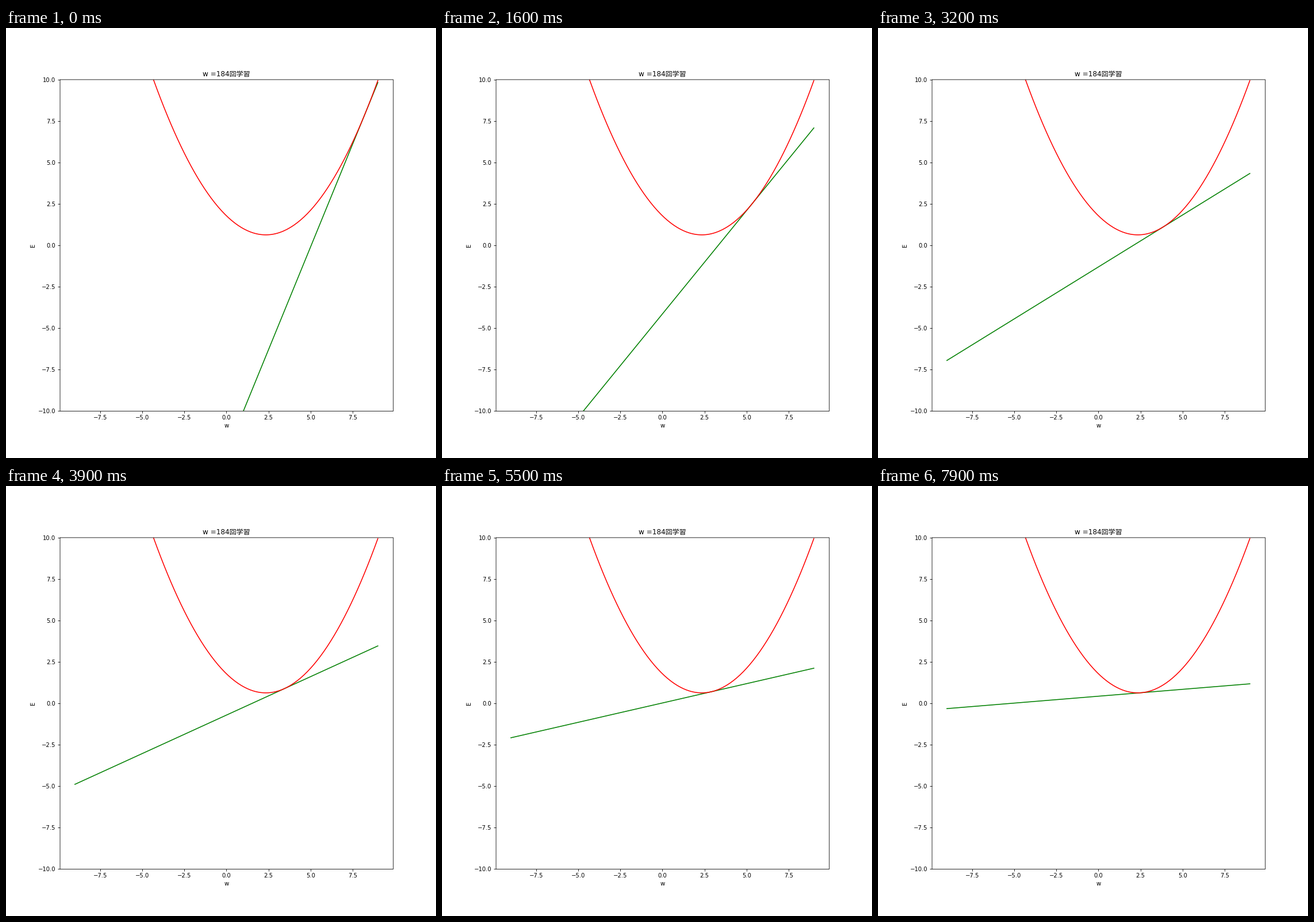
A matplotlib script that plays this animation: 748x748 px, repeating every 8000 ms.

```python
import numpy as np
import matplotlib.pyplot as plt
from matplotlib.animation import FuncAnimation

INCHES, DPI = 10, 74.8
STEPS, INTERVAL = 80, 100

# Error curve E(w) = A (w - W_MIN)^2 + E_MIN
A, W_MIN, E_MIN = 0.2104, 2.344, 0.622
RATE = 0.1
W_START = 8.247

plt.rcParams["font.family"] = ["DejaVu Sans", "Noto Sans CJK JP"]
plt.rcParams["font.size"] = 9.6


def error(w):
    return A * (w - W_MIN) ** 2 + E_MIN


def gradient(w):
    return 2 * A * (w - W_MIN)


def weight(step):
    """Weight after the given number of gradient descent steps."""
    return W_MIN + (W_START - W_MIN) * (1 - 2 * A * RATE) ** step


def add_frame(left, bottom, width, height):
    """Plot border, measured in points and not snapped to whole pixels."""
    ax.spines[:].set_visible(False)
    fig.add_artist(plt.Rectangle(
        (left / 72, bottom / 72), width / 72, height / 72, fill=False,
        lw=0.8, snap=False, transform=fig.dpi_scale_trans))


fig, ax = plt.subplots(figsize=(INCHES, INCHES), dpi=DPI)
ax.set_xlim(-9.9, 9.9)
ax.set_ylim(-10, 10)
ax.set_xlabel("w")
ax.set_ylabel("E")
ax.set_title("w =184回学習")
add_frame(90.5, 78.5, 558, 555)

ws = np.linspace(-9, 9, 181)
ends = np.array([-9, 9])
tangent, = ax.plot([], [], color="green")
ax.plot(ws, error(ws), color="red")


def update(step):
    w = weight(step)
    tangent.set_data(ends, error(w) + gradient(w) * (ends - w))
    return tangent,


anim = FuncAnimation(fig, update, frames=STEPS, interval=INTERVAL,
                     repeat=True, repeat_delay=0)
plt.show()
```
